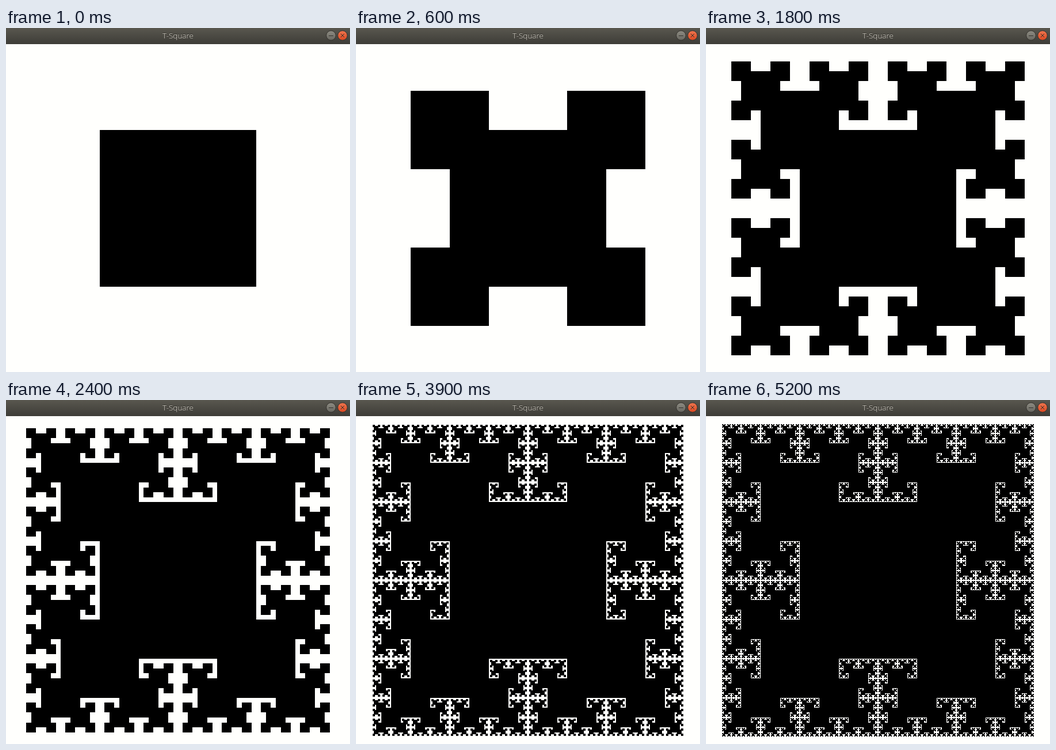
Recreate the animation shown at these times as an HTML page. Size 598x597 px, loop 6.2 s.

```html
<!DOCTYPE html>
<html lang="en">
<head>
<meta charset="utf-8">
<title>T-Square</title>
<style>
  html, body { margin: 0; width: 100%; height: 100%; overflow: hidden; background: #fffffd; }
  svg { display: block; width: 598px; height: 597px; }
  text { font: 300 13.5px "Open Sans", "Noto Sans", sans-serif; text-anchor: middle; }
</style>
</head>
<body>
<svg viewBox="0 0 598 597">
  <defs>
    <linearGradient id="bar" x2="0" y2="1">
      <stop offset="0" stop-color="#59574f"/>
      <stop offset="1" stop-color="#3d3c37"/>
    </linearGradient>
    <linearGradient id="grey" x2="0" y2="1">
      <stop offset="0" stop-color="#8d8b82"/>
      <stop offset="1" stop-color="#686760"/>
    </linearGradient>
    <linearGradient id="red" x2="0" y2="1">
      <stop offset="0" stop-color="#f0764f"/>
      <stop offset="1" stop-color="#db4821"/>
    </linearGradient>
  </defs>
  <rect width="598" height="597" fill="#fffffd"/>
  <g id="fractal" shape-rendering="crispEdges"></g>
  <rect width="598" height="28" fill="url(#bar)"/>
  <text x="299" y="17" fill="#25241f">T-Square</text>
  <text x="299" y="18" fill="#dfdbd2">T-Square</text>
  <g stroke="#33322d">
    <circle cx="565" cy="13" r="8.3" fill="url(#grey)"/>
    <circle cx="585" cy="13" r="8.3" fill="url(#red)"/>
    <path d="M561 13.5h8M582 10l6 6m0-6l-6 6" fill="none"/>
  </g>
</svg>
<script>
  const LOOP = 6200;
  const STARTS = [0, 600, 1300, 1800, 2400, 3200, 3900, 5200];
  const group = document.getElementById('fractal');
  const outlines = STARTS.map(() => []);

  // Half pixels snap away from the parent square's centre.
  const snap = (pos, dir) => Math.round(pos + dir * 0.01);

  function addSquares(x, y, size, level, dx, dy) {
    const w = Math.floor(size);
    outlines[level].push(`M${snap(x, dx)} ${snap(y, dy)}h${w}v${w}h${-w}z`);
    if (level === STARTS.length - 1) return;
    const half = size / 2;
    for (const cx of [-1, 1]) {
      for (const cy of [-1, 1]) {
        // The corner facing the parent is already covered.
        if (cx === -dx && cy === -dy) continue;
        addSquares(x + half / 2 + cx * half, y + half / 2 + cy * half, half, level + 1, cx, cy);
      }
    }
  }

  addSquares(163, 177, 272, 0, 0, 0);

  const layers = outlines.map(parts => {
    const path = document.createElementNS('http://www.w3.org/2000/svg', 'path');
    path.setAttribute('d', parts.join(''));
    group.appendChild(path);
    return path;
  });

  let shown = -1;
  function render(time) {
    const t = time % LOOP;
    const level = STARTS.filter(start => start <= t).length - 1;
    if (level === shown) return;
    shown = level;
    layers.forEach((path, i) => path.setAttribute('display', i <= level ? 'inline' : 'none'));
  }

  const origin = performance.now();
  function tick() {
    render(performance.now() - origin);
    requestAnimationFrame(tick);
  }
  tick();
</script>
</body>
</html>
```
